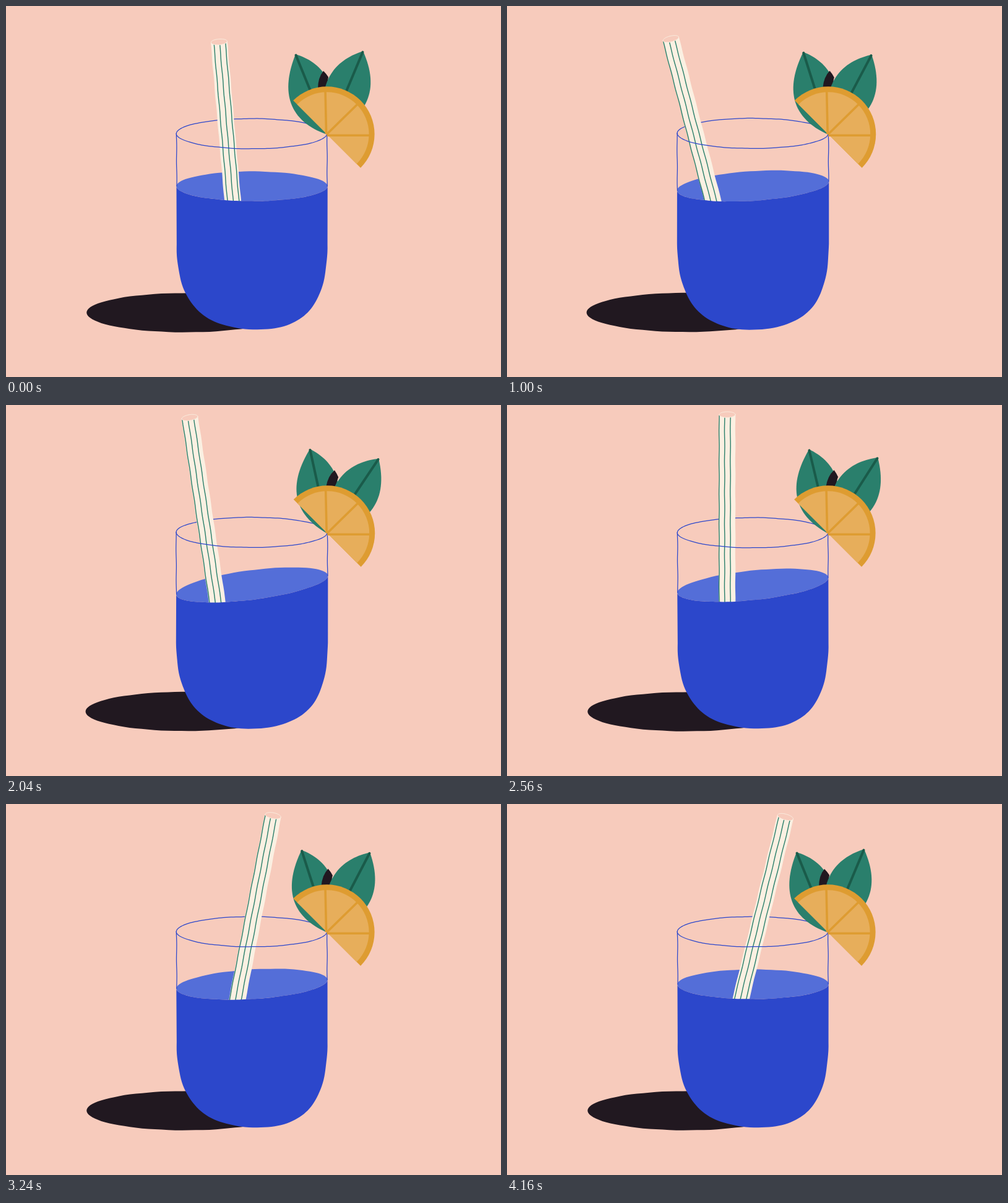
Animation, 800 px wide and 600 px high, one loop 4200 ms. Source, as an HTML page with a canvas:

```html
<!DOCTYPE html>
<html lang="en">
<head>
<meta charset="utf-8">
<title>Stirred drink</title>
<style>
html, body { margin: 0; width: 100%; height: 100%; overflow: hidden; background: #f7cbbc; }
canvas { display: block; }
</style>
</head>
<body>
<canvas id="stage" width="800" height="600"></canvas>
<script>
const ctx = document.getElementById('stage').getContext('2d');
const LOOP = 4200, STEP = 40, BOIL = 520;
const BG = '#f7cbbc', BLUE = '#2c47cb', SURFACE = '#546ed8', INK = '#211820',
  CREAM = '#fbf0e2', STRIPE = '#2a7f6a', LEAF = '#2a7f6c', VEIN = '#1a5b4a',
  RIND = '#de9c31', FLESH = '#e7ae5b';
const LEVEL = 291.5, GLASS_LINE = 1.25, STRAW_HALF = 13.4, STRIPE_GAP = 9.3;

// time, straw top x, top y, bottom x, stripe offset
const STIR = [
  [0, 344.3, 58, 366.4, 4.9],
  [600, 298.3, 57, 344.3, 9],
  [1120, 256, 52, 330, 10.1],
  [1400, 239.5, 45, 326, 10.4],
  [1680, 259, 31, 331, 10.5],
  [2040, 297.5, 21, 341, 10.4],
  [2560, 355.7, 15.5, 355.7, 9.4],
  [3240, 431.5, 19, 374, 10.4],
  [3720, 457, 21.5, 380.5, 11.6],
  [4160, 450, 21, 378, 12.5]
];

let pose = 0;

// Smooth curve through the keys
function track(t, col) {
  const last = STIR.length - 1;
  let i = 0;
  while (i < last - 1 && t > STIR[i + 1][0]) i++;
  const slope = k => {
    const a = STIR[Math.max(k - 1, 0)], b = STIR[Math.min(k + 1, last)];
    return (b[col] - a[col]) / (b[0] - a[0]);
  };
  const a = STIR[i], b = STIR[i + 1], d = b[0] - a[0];
  const u = Math.min((t - a[0]) / d, 1), v = 1 - u;
  return a[col] * v * v * (1 + 2 * u) + b[col] * u * u * (3 - 2 * u) +
    d * u * v * (slope(i) * v - slope(i + 1) * u);
}

// Hand-drawn unevenness with two alternating poses
function warp([x, y]) {
  const p = pose * 2.2;
  return [
    x + 0.25 * Math.sin(y / 8 + x / 60 + p) + pose * (x - 400) / 200,
    y + 0.2 * Math.sin(x / 9 + y / 60 + p) - pose * 0.5
  ];
}

const sample = (n, f) => Array.from({ length: n + 1 }, (_, i) => f(i / n));

const line = (a, b) => sample(40, u => [a[0] + (b[0] - a[0]) * u, a[1] + (b[1] - a[1]) * u]);

const bezier = (a, b, c, d) => sample(40, u => [0, 1].map(k => {
  const v = 1 - u;
  return a[k] * v * v * v + 3 * b[k] * v * v * u + 3 * c[k] * v * u * u + d[k] * u * u * u;
}));

const oval = (cx, cy, rx, ry, from = 0, to = 2 * Math.PI, tilt = 0) => sample(90, u => {
  const a = from + (to - from) * u, c = Math.cos(a);
  return [cx + rx * c, cy + ry * Math.sin(a) - tilt * c];
});

function trace(points) {
  ctx.beginPath();
  points.map(warp).forEach(p => ctx.lineTo(...p));
}

function fill(points, color) {
  trace(points);
  ctx.fillStyle = color;
  ctx.fill();
}

function stroke(points, color, width) {
  trace(points);
  ctx.strokeStyle = color;
  ctx.lineWidth = width;
  ctx.stroke();
}

function straw(t) {
  const x = track(t, 1), y = track(t, 2), dx = track(t, 3) - x, dy = 315 - y;
  const len = Math.hypot(dx, dy) + 20, turn = Math.atan2(-dx, dy);
  const c = Math.cos(turn), s = Math.sin(turn), half = STRAW_HALF;
  const place = ([u, v]) => [x + u * c - v * s, y + u * s + v * c];
  const side = u => line([u, 0], [u, len]).map(place);
  const cap = oval(0, 0, half - 0.4, 4.7).map(place);

  fill([...side(-half), ...side(half).reverse()], CREAM);
  for (let u = track(t, 4) % STRIPE_GAP; u < 2 * half + 0.5; u += STRIPE_GAP) {
    const v = Math.min(Math.max(u, 0.6), 2 * half - 0.4) - half;
    const drop = 4.7 * Math.sqrt(Math.max(0, 1 - (v / half) ** 2));
    stroke(line([v, drop], [v, len]).map(place), STRIPE, 1.4);
  }
  fill(cap, BG);
  stroke(cap, CREAM, 1);
}

function liquidBody(tilt) {
  const base = [406 - 14 * pose, 523.4 + pose];
  fill([
    ...oval(397.5, LEVEL, 122, 24, Math.PI, 0, tilt),
    ...bezier([519.5, 385], [519, 478], [488, 523], base),
    ...bezier(base, [312, 522], [276, 476], [275.7, 385])
  ], BLUE);
}

function leaf(path, veinPath, angle, extra) {
  ctx.save();
  ctx.translate(519 + pose * 0.4, 208);
  ctx.rotate(angle * Math.PI / 180);
  ctx.translate(-519, -208);
  paint(path, LEAF);
  vein(veinPath, VEIN, 4);
  if (extra) paint(extra, INK);
  ctx.restore();
}

function paint(path, color) {
  ctx.fillStyle = color;
  ctx.fill(new Path2D(path));
}

function vein(path, color, width) {
  ctx.strokeStyle = color;
  ctx.lineWidth = width;
  ctx.stroke(new Path2D(path));
}

function leaves(t) {
  const swing = (1 - Math.cos(2 * Math.PI * t / LOOP)) / 2;
  leaf('M468 78C443 140 457 186 519 208C545 125 508 90 468 78Z', 'M468.5 79.5L520 206',
    swing * 9.8, 'M513 105Q504 116 504 134L518 134L521 115Q518 110 513 105Z');
  leaf('M577 73C540 85 495 115 519 208C585 180 605 135 577 73Z', 'M576.5 74.5L521 207',
    swing * 11.1);
}

function orange() {
  const half = (r, color) => {
    ctx.beginPath();
    ctx.arc(0, 0, r, -Math.PI * 0.75, Math.PI / 4);
    ctx.fillStyle = color;
    ctx.fill();
  };
  ctx.save();
  ctx.translate(518.6 + pose * 0.6, 207.3);
  half(77, RIND);
  half(68, FLESH);
  ctx.lineCap = 'butt';
  vein('M-1 0L-2.5 -69M0 0L49 -48M0 2L69 2', RIND, 3.6);
  ctx.restore();
}

function draw(t) {
  pose = Math.floor(t / BOIL) % 2;
  const tilt = 15.6 * (1 - Math.abs(2 * t / LOOP - 1));
  ctx.lineCap = ctx.lineJoin = 'round';
  ctx.fillStyle = BG;
  ctx.fillRect(0, 0, 800, 600);

  const rim = (from, to) =>
    stroke(oval(397.2, 206.5, 121.7, 24.4, from, to), BLUE, GLASS_LINE);
  fill(oval(290, 496, 160, 31.7), INK);
  rim(Math.PI, 2 * Math.PI);
  fill(oval(397.5, LEVEL, 122, 24, 0, 2 * Math.PI, tilt), SURFACE);
  straw(t);
  liquidBody(tilt);
  rim(0, Math.PI);
  stroke(line([275.5, 206.5], [276, LEVEL + tilt]), BLUE, GLASS_LINE);
  stroke(line([518.9, 206.5], [519.1, LEVEL - tilt]), BLUE, GLASS_LINE);
  leaves(t);
  orange();
}

const start = performance.now();
function tick() {
  const t = (performance.now() - start) % LOOP;
  draw(Math.floor(t / STEP) * STEP);
  requestAnimationFrame(tick);
}
tick();
</script>
</body>
</html>
```
